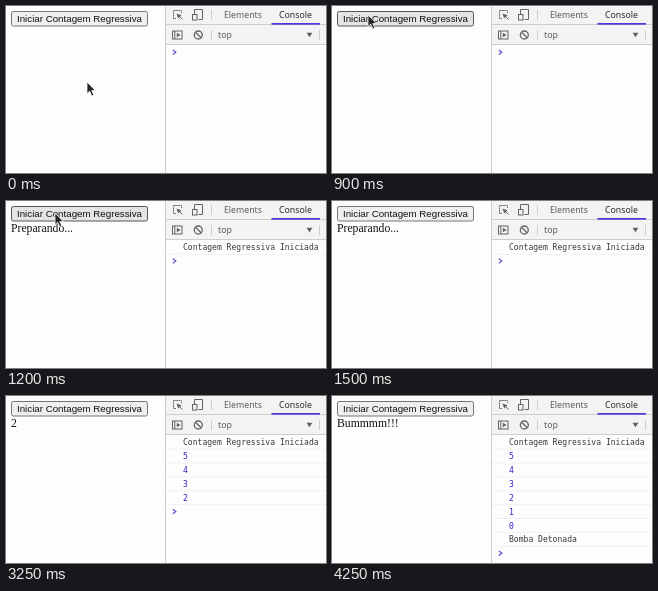
An HTML page that plays this animation: 320x167 px, repeating every 4.6 s.

```html
<!DOCTYPE html>
<html lang="pt">
<head>
<meta charset="utf-8">
<title>Contagem Regressiva</title>
<style>
  html, body { margin: 0; width: 100%; height: 100%; overflow: hidden; background: #fdfdfd; }
  svg { display: block; width: 100%; height: 100%; }
  .page { font: 11.7px "Liberation Serif", "Times New Roman", serif; fill: #111; }
  .button { font: 9.74px "Liberation Sans", Arial, sans-serif; fill: #111; }
  .ui { font: 8.75px "Noto Sans", sans-serif; fill: #5a5a5a; }
  .ui.active { fill: #2b2b2b; }
  .log { font: 8.05px "DejaVu Sans Mono", monospace; fill: #383838; }
  .num { fill: #3a22c8; }
  .icon { fill: none; stroke: #636363; stroke-width: 1; }
  .rule { stroke: #cdcdcd; stroke-width: 1; }
  .sep { stroke: #f1f1f1; stroke-width: 1; }
</style>
</head>
<body>
<svg viewBox="0 0 320 167">
  <rect width="320" height="167" fill="#fdfdfd"/>

  <rect id="button" x="5.5" y="5.5" width="136" height="14.5" rx="1.8"/>
  <text class="button" x="11" y="16.4">Iniciar Contagem Regressiva</text>
  <text id="status" class="page" x="5" y="31"></text>

  <rect x="160" width="160" height="38" fill="#f3f3f3"/>
  <path class="rule" d="M159.5 0V167M160 18.5H320M160 38.5H320M205.5 4V14M205.5 24V34M313.5 24V34"/>

  <g class="icon">
    <path d="M170 12.5H167.5V4.5H175.5V7" stroke-dasharray="1.6 .6"/>
    <path d="M176.5 13.5L172 9"/>
    <path d="M170.5 7.5L175.5 9.2L172.2 12.5Z" fill="#636363" stroke="none"/>
    <path d="M188.5 8V3.5H196.5V13.5H192.5"/>
    <rect x="186.5" y="8.5" width="4.5" height="5.5"/>
    <rect x="166.5" y="25" width="9.5" height="8"/>
    <path d="M168.8 25V33"/>
    <path d="M170.8 26.8L174.5 29L170.8 31.2Z" fill="#636363" stroke="none"/>
    <g stroke-width="1.3">
      <circle cx="192.3" cy="29" r="4"/>
      <path d="M189.5 26.2L195.1 31.8"/>
    </g>
  </g>
  <text class="ui" x="218" y="12.2">Elements</text>
  <text class="ui active" x="273" y="12.2">Console</text>
  <rect x="265.5" y="17" width="48.5" height="1.7" fill="#4a3adc"/>
  <text class="ui" x="212" y="32.1">top</text>
  <path d="M300.6 26.8H306.4L303.5 31.3Z" fill="#5f5f5f"/>

  <g id="rows"></g>
  <path id="prompt" d="M166.8 -2.3L169.8 0L166.8 2.3" fill="none" stroke="#5a50d4" stroke-width="1.2"/>

  <path id="cursor" d="M0 0V11.6L2.7 9.2L4.8 14L6.8 13.1L4.8 8.5H8.3Z"
        fill="#252525" stroke="#f4f4f4" stroke-width=".8" stroke-linejoin="round"/>
</svg>
<script>
const LOOP = 4600, TICK = 50, PITCH = 13.87;
const $ = id => document.getElementById(id);

// Console output: time and text
const logs = [[1150, "Contagem Regressiva Iniciada"]];
for (let n = 5; n >= 0; n--) logs.push([1700 + (5 - n) * 500, String(n)]);
logs.push([4200, "Bomba Detonada"]);

// Pointer path: time, x, y
const path = [
  [0, 81, 76], [250, 52, 62], [500, 16, 40], [600, 16, 40],
  [750, 24, 23], [900, 36, 9], [1100, 49, 12], [1200, 49, 12],
  [1450, 92, 77]
];
const POINTER_END = 1500;

function make(tag, attrs, parent) {
  const el = document.createElementNS("http://www.w3.org/2000/svg", tag);
  for (const key in attrs) el.setAttribute(key, attrs[key]);
  return parent.appendChild(el);
}

const rows = logs.map(([time, text], i) => {
  const group = make("g", { transform: `translate(0 ${i * PITCH})` }, $("rows"));
  const isNumber = text.length === 1;
  make("text", { class: isNumber ? "log num" : "log", x: 177, y: 49.4 }, group).textContent = text;
  make("path", { class: "sep", d: "M160 53.2H320" }, group);
  return { time, group };
});

function pointerAt(t) {
  const i = path.findIndex(p => p[0] > t);
  if (i < 0) return path[path.length - 1].slice(1);
  const [t0, x0, y0] = path[i - 1], [t1, x1, y1] = path[i];
  const k = (t - t0) / (t1 - t0);
  return [x0 + (x1 - x0) * k, y0 + (y1 - y0) * k];
}

function statusAt(t) {
  if (t < 1150) return "";
  if (t < 1700) return "Preparando...";
  if (t < 4200) return String(5 - Math.floor((t - 1700) / 500));
  return "Bummmm!!!";
}

function draw(time) {
  const t = Math.floor((time % LOOP) / TICK) * TICK;
  const [x, y] = pointerAt(t);
  const visible = t < POINTER_END;
  const hover = visible && x > 5 && x < 142 && y > 5 && y < 20;

  $("cursor").setAttribute("transform", `translate(${x} ${y})`);
  $("cursor").style.display = visible ? "" : "none";
  $("button").setAttribute("fill", hover ? "#e4e4e4" : "#efefef");
  $("button").setAttribute("stroke", hover ? "#565656" : "#767676");
  $("status").textContent = statusAt(t);

  let count = 0;
  for (const row of rows) {
    const shown = t >= row.time;
    row.group.style.display = shown ? "" : "none";
    if (shown) count++;
  }
  $("prompt").setAttribute("transform", `translate(0 ${46.2 + count * PITCH})`);
}

const start = performance.now();
function frame() {
  draw(performance.now() - start);
  requestAnimationFrame(frame);
}
frame();
</script>
</body>
</html>
```
